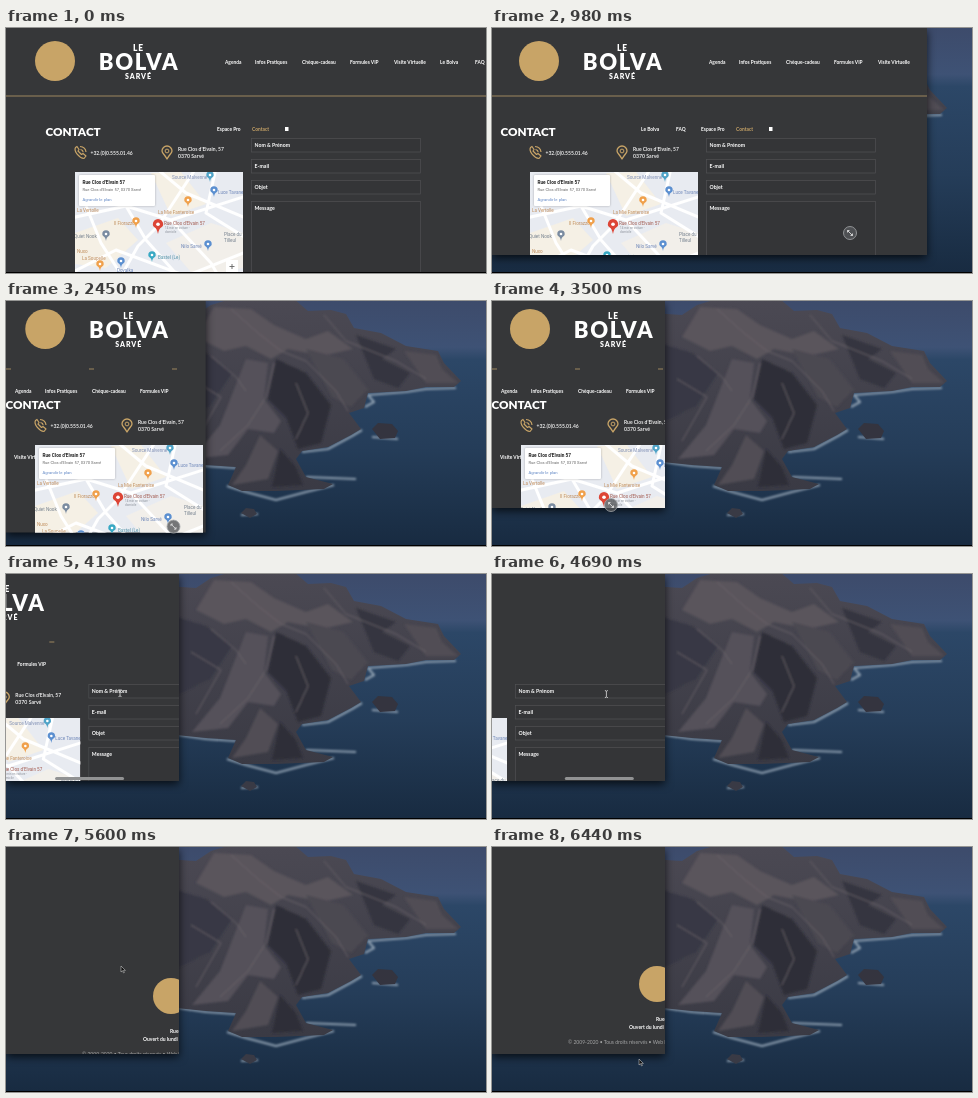
An HTML page for the animation above (6.51 s loop, 480 by 245 pixels).

```html
<!DOCTYPE html>
<html lang="fr">
<head>
<meta charset="utf-8">
<title>Responsive contact page</title>
<style>
html, body { margin: 0; width: 100%; height: 100%; overflow: hidden; background: #000; }
svg { display: block; width: 100vw; height: 100vh; font-family: Lato, "Open Sans", sans-serif; }
#frame { filter: drop-shadow(0 3px 4px #000b); }
#map { font-family: Roboto, sans-serif; }
</style>
</head>
<body>
<svg id="stage" viewBox="0 0 480 245"></svg>
<script>
const LOOP = 6510, STEP = 70, GOLD = '#c8a467';
const $ = id => document.getElementById(id);

// Linear interpolation through [position, value] points.
function track(points, p) {
  if (p <= points[0][0]) return points[0][1];
  for (let i = 1; i < points.length; i++) {
    const [a, u] = points[i - 1], [b, v] = points[i];
    if (p <= b) return u + (v - u) * (p - a) / (b - a);
  }
  return points[points.length - 1][1];
}

const text = (x, y, s, size, fill = '#fff', more = '') =>
  `<text x="${x}" y="${y}" font-size="${size}" fill="${fill}" ${more}>${s}</text>`;
const rect = (x, y, w, h, fill, more = '') =>
  `<rect x="${x}" y="${y}" width="${w}" height="${h}" fill="${fill}" ${more}/>`;
const poly = (points, fill) => `<polygon points="${points}" fill="${fill}"/>`;
const path = (d, stroke, width = 1) =>
  `<path d="${d}" fill="none" stroke="${stroke}" stroke-width="${width}" stroke-linejoin="round"/>`;
const marker = (x, y, fill, k = 1) =>
  `<path transform="translate(${x} ${y}) scale(${k})" fill="${fill}"
    d="M0 5C-1-1-3.7 1-3.7-2A3.7 3.7 0 0 1 3.7-2C3.7 1 1-1 0 5Z"/>
   <circle cx="${x}" cy="${y - 2 * k}" r="${1.3 * k}" fill="#fff"/>`;

function wallpaper() {
  const coast = '160,12 190,14 205,4 225,-2 288,-2 302,10 325,9 340,13 348,27 375,32 400,45 432,50 ' +
    '438,62 455,80 448,86 420,86 400,90 362,92 358,107 343,112 355,128 345,134 322,146 296,150 ' +
    '290,158 300,176 327,183 318,188 270,190 236,190 222,184 230,166 200,164 160,160';
  return rect(0, 0, 480, 244, 'url(#sea)') +
    `<g filter="url(#soft)">` +
    path('M173 161L200 165 230 167M221 185L240 191 270 199 300 191 328 184M300 176L350 178' +
      'M296 151L322 148 346 135 356 129M359 106L368 101 362 94 400 91 420 88 450 87M366 136L392 138M235 214L252 213',
      '#8c9dae', 2.2) + `</g>` +
    poly(coast, 'url(#rock)') +
    `<g filter="url(#soft)">` +
    poly('208,6 245,8 268,24 300,38 322,30 347,48 316,55 282,48 265,58 240,45 218,50 190,36', '#5a555c') +
    poly('270,58 300,72 325,104 315,142 292,148 280,116 262,98', '#2d2e38') +
    poly('240,58 262,62 258,98 275,120 268,132 242,128 222,154 186,158 214,124', '#55515a') +
    poly('160,40 200,52 226,72 204,105 173,120 160,110', '#383945') +
    poly('300,48 338,58 362,88 345,106 326,96', '#4b4851') +
    poly('350,34 390,48 376,58 404,72 392,87 368,78', '#34353f') +
    poly('398,50 430,54 436,68 452,82 420,82', '#514d55') +
    poly('254,134 272,150 262,178 226,184 240,164', '#514d55') +
    poly('274,148 290,166 297,184 266,186', '#2e2f39') +
    path('M225 8L252 32 275 50 300 60 330 90 342 110M268 62L260 96 242 124 214 150M205 55L230 76 240 90' +
      'M318 14L340 40 390 60 420 78M185 78L215 96 190 140M290 82L302 112 290 138', '#6d666b', .9) +
    `</g>` +
    poly('366,128 372,122 386,123 392,130 389,137 374,138', '#34343f') +
    poly('235,212 240,207 248,208 251,213 244,217', '#393a45');
}

function contactForm() {
  const fields = [['Nom &amp; Prénom', 110, 13.5], ['E-mail', 131, 13.5], ['Objet', 152, 13.5], ['Message', 173, 75]];
  return fields.map(([label, y, h]) =>
    rect(205.5, y + .5, 169, h, '#343537', 'stroke="#505153" stroke-width=".7"') +
    text(208.5, y + 8.8, label, 5.2, '#fff', 'font-weight="700"')).join('');
}

function cityMap() {
  const places = [
    [126, 151, 'Source Malvenne', '#8190b5', 164, 149, '#4fa3c7'],
    [172, 166, 'Luce Tavanel', '#6d86b8', 168, 164, '#5b8fd0'],
    [31, 184, 'La Vertolle', '#c08d5c'],
    [112, 186, 'La Mie Fanteroise', '#c08d5c', 142, 174, '#f0a04b'],
    [68, 197, 'Il Fiorazzo', '#c08d5c', 90, 195, '#f0a04b'],
    [28, 210, 'Quiet Nook', '#75808e', 60, 208, '#7a8ba0'],
    [135, 220, 'Nilo Sarvé', '#6d86b8', 162, 218, '#5b8fd0'],
    [112, 231, 'Bastel (Le)', '#4d8fa5', 106, 229, '#38a9c4'],
    [31, 225, 'Nuxo', '#c08d5c'],
    [36, 232, 'La Soupelle', '#c08d5c', 54, 238, '#f0a04b'],
    [71, 244, 'Dovalka', '#6d86b8', 75, 235, '#5b8fd0'],
    [59, 254, 'Cambirox', '#75808e', 55, 252, '#7a8ba0'],
    [178, 208, 'Place du', '#75808e'],
    [178, 214, 'Tilleul', '#75808e']
  ];
  return `<g id="map" clip-path="url(#mapClip)">` + rect(29, 144, 168, 125, '#e8ebf1') +
    poly('29,205 72,190 92,212 60,240 29,236', '#f5f0e5') +
    poly('105,145 135,144 160,176 125,188', '#f5f0e5') +
    poly('120,215 165,195 197,205 197,240 150,250', '#f2efea') +
    path('M25 190L80 178 125 192 200 168M60 275L92 218 112 198 150 140M25 245L70 222 140 248 200 224' +
      'M80 178L100 212 150 268M125 192L165 235 185 270M110 140L140 165 200 190M40 178L55 215 90 270' +
      'M170 140L160 185 200 210', '#fff', 3) +
    places.map(([x, y, name, fill, px, py, pin]) =>
      text(x, y, name, 4.6, fill) + (px ? marker(px, py, pin) : '')).join('') +
    text(118, 196.5, "Rue Clos d'Elvain 57", 4.6, '#a1584d') +
    text(119, 201, '14 min en voiture -', 3, '#8a9099') + text(119, 204.5, 'domicile', 3, '#8a9099') +
    marker(112, 199, '#dd4536', 1.4) +
    rect(33, 147, 76, 31, '#fff', 'rx="1" filter="drop-shadow(0 .5px .8px #0004)"') +
    text(36.5, 156, "Rue Clos d'Elvain 57", 4.7, '#222', 'font-weight="700"') +
    text(36.5, 163, "Rue Clos d'Elvain 57, 0370 Sarvé", 4.1, '#666') +
    text(36.5, 173, 'Agrandir le plan', 4.2, '#5f86c4') +
    rect(33, 246, 13, 13, '#68706c', 'stroke="#fff" stroke-width=".8"') +
    rect(180, 232, 12, 14, '#fff') + path('M183.5 238.5h5M186 236v5', '#666', .9) +
    `<circle cx="112" cy="258" r="3" fill="#8a8f96"/>` +
    rect(29, 262, 168, 7, '#f3f4f6') +
    text(34, 266.5, 'Données cartographiques ©2020 Cartoly', 3.2, '#555') +
    text(102, 266.5, "Conditions d'utilisation", 3.2, '#555') +
    text(140, 266.5, 'Signaler une erreur', 3.2, '#555') + `</g>`;
}

function contactBody() {
  return text(-.5, 108.3, 'CONTACT', 11.7, '#fff', 'font-weight="900"') +
    path('M29.5 119.5C27.5 123 33 130 38 130.5L40 128 37 125.5 35.5 126.5 32 123 33 121.5 31 118.5Z' +
      'M34 118.5Q39.5 119 40 124M34.5 121.5Q37 122 37.2 124.2', GOLD, 1.2) +
    text(44.5, 126.5, '+32.(0)0.555.01.46', 5, '#fff', 'font-weight="600"') +
    path('M121 131C119 127 116 125 116 123A5 5 0 0 1 126 123C126 125 123 127 121 131Z', GOLD, 1.3) +
    `<circle cx="121" cy="123" r="1.9" fill="none" stroke="${GOLD}"/>` +
    text(132, 123, "Rue Clos d'Elvain, 57", 5, '#fff', 'font-weight="600"') +
    text(132, 129.6, '0370 Sarvé', 5.2, '#fff', 'font-weight="600"') +
    contactForm() + cityMap();
}

const header = `<circle cy="33" r="20" fill="${GOLD}"/>` +
  `<g text-anchor="middle" font-weight="900">` +
  text(83.5, 23.4, 'LE', 8.4, '#fff', 'letter-spacing="1"') +
  text(84, 41.6, 'BOLVA', 22, '#fff', 'letter-spacing="1.6"') +
  text(83.5, 51, 'SARVÉ', 7, '#fff', 'letter-spacing="1"') + `</g>`;

const footer = `<circle cx="165" cy="467" r="18" fill="${GOLD}"/>` +
  text(164, 504, "Rue Clos d'Elvain 57", 5, '#fff', 'font-weight="700"') +
  text(137, 512, 'Ouvert du lundi au vendredi', 5, '#fff', 'font-weight="700"') +
  text(76, 527, '© 2009-2020 • Tous droits réservés • Web Design', 5, '#a4a5a6');

const labels = ['Agenda', 'Infos Pratiques', 'Chèque-cadeau', 'Formules VIP', 'Visite Virtuelle',
  'Le Bolva', 'FAQ', 'Espace Pro', 'Contact', ''];
const offsets = [0, 30, 77, 125, 169, 215, 250, 275, 310, 343, 360];
const menu = labels.map((label, i) => `<g id="item${i}">` + (label
  ? text(0, 0, label, 4.85, label === 'Contact' ? GOLD : '#fff', 'font-weight="700"')
  : rect(0, -4, 3.5, 4, '#fff')) + `</g>`).join('');

$('stage').innerHTML = `<defs>
  <linearGradient id="sea" x2="0" y2="1">
    <stop offset="0" stop-color="#3d4b6b"/><stop offset=".19" stop-color="#3e5275"/>
    <stop offset=".24" stop-color="#2c4767"/><stop offset=".6" stop-color="#253d59"/>
    <stop offset="1" stop-color="#182b41"/></linearGradient>
  <linearGradient id="rock" x2="0" y2="1">
    <stop offset="0" stop-color="#4b4953"/><stop offset="1" stop-color="#3a3a44"/></linearGradient>
  <filter id="soft"><feGaussianBlur stdDeviation="1.1"/></filter>
  <clipPath id="winClip"><rect id="clip"/></clipPath>
  <clipPath id="mapClip"><rect x="29" y="144" width="168" height="125"/></clipPath>
  <clipPath id="screen"><rect width="480" height="244"/></clipPath></defs>
  <g clip-path="url(#screen)">${wallpaper()}
    <rect id="frame" fill="#363739"/>
    <g clip-path="url(#winClip)">
      <g id="page">
        <path id="rule" stroke="#a98f64" stroke-width=".9"/>
        <g id="header">${header}</g>${menu}
        <g id="body">${contactBody()}</g>${footer}
      </g>
      <rect id="bar" y="203" width="69" height="3" rx="1.5" fill="#919293"/>
    </g>
    <g id="ring"><circle r="6.5" fill="#55575acc" stroke="#a5a7aa" stroke-width=".8"/>
      ${path('M-2.5-.5V-2.5H-.5M-2.5-2.5L2.5 2.5M2.5 .5V2.5H.5', '#ddd', .9)}</g>
    <g id="beam">${path('M-1.5-3.5Q0-3.5 0-2.5V2.5Q0 3.5-1.5 3.5M1.5-3.5Q0-3.5 0-2.5M0 2.5Q0 3.5 1.5 3.5', '#ddd', .8)}</g>
    <path id="arrow" d="M0-2v6l1.5-1.3 1 2.2 .9-.4-1-2.1h2z" fill="#111" stroke="#ddd" stroke-width=".5"/>
  </g>`;

// Time tracks, in ms.
const winW = [[280, 497], [700, 463], [980, 435], [1400, 330], [1610, 288], [2100, 234], [2600, 185], [2900, 173]];
const winH = [[280, 244], [700, 235], [980, 227], [1400, 200], [1610, 192], [2100, 207], [2500, 235], [3000, 235], [3500, 207]];
const scrollX = [[3900, 0], [4350, 240], [4500, 240], [4690, 182], [4950, 0], [5040, -5], [5180, -5], [5320, 0]];
const scrollY = [[4950, 0], [5180, 123], [5600, 318], [5740, 330]];
const cursorX = [[0, 500], [350, 462], [980, 358], [1610, 287], [2100, 220], [2700, 130], [3500, 119], [4100, 114],
  [5600, 115], [5900, 280], [6300, 147]];
const cursorY = [[0, 252], [350, 236], [980, 205], [1610, 190], [2100, 206], [2600, 234], [3000, 234], [3500, 204],
  [4100, 119], [5180, 121], [5600, 121], [5900, 185], [6300, 214]];
const logoX = [[173, 38], [288, 43.5], [435, 47], [497, 49]];

const move = (id, x, y) => $(id).setAttribute('transform', `translate(${x} ${y})`);
const show = (id, on) => $(id).setAttribute('visibility', on ? 'visible' : 'hidden');

function layMenu(w, lx) {
  const narrow = w < 234, start = narrow ? 9 : lx + 170;
  let first = 0;
  while (first < 10 && start + offsets[first + 1] - 13 < w - 4) first++;
  labels.forEach((_, i) => {
    if (i < first) move('item' + i, start + offsets[i], narrow ? 91.7 : 36);
    else if (narrow) move('item' + i, 8 + offsets[i] - offsets[first], 158.3);
    else move('item' + i, lx + 230 - offsets[9] + offsets[i], 103);
  });
}

function draw(t) {
  const w = track(winW, t), h = track(winH, t), narrow = w < 234;
  const sx = track(scrollX, t), sy = track(scrollY, t), lx = track(logoX, w);
  for (const id of ['frame', 'clip']) {
    $(id).setAttribute('width', w);
    $(id).setAttribute('height', h);
  }
  move('page', -sx, -sy);
  move('header', lx, narrow ? -5 : 0);
  move('body', Math.max(0, (w - 417) / 2), 0);
  $('rule').setAttribute('d', `M0 68H${w}`);
  $('rule').setAttribute('stroke-dasharray', narrow ? '5 78' : 'none');
  layMenu(w, lx);

  move('bar', Math.max(0, sx) * .4, 0);
  show('bar', t > 3900 && t < 5500);

  const ring = t < 3640, beam = t > 4100 && sx > 90;
  show('ring', ring);
  show('beam', beam);
  show('arrow', !ring && !beam);
  for (const id of ['ring', 'beam', 'arrow']) move(id, track(cursorX, t), track(cursorY, t));
}

const begin = performance.now();
function tick() {
  draw(Math.floor((performance.now() - begin) % LOOP / STEP) * STEP);
  requestAnimationFrame(tick);
}
tick();
</script>
</body>
</html>
```
